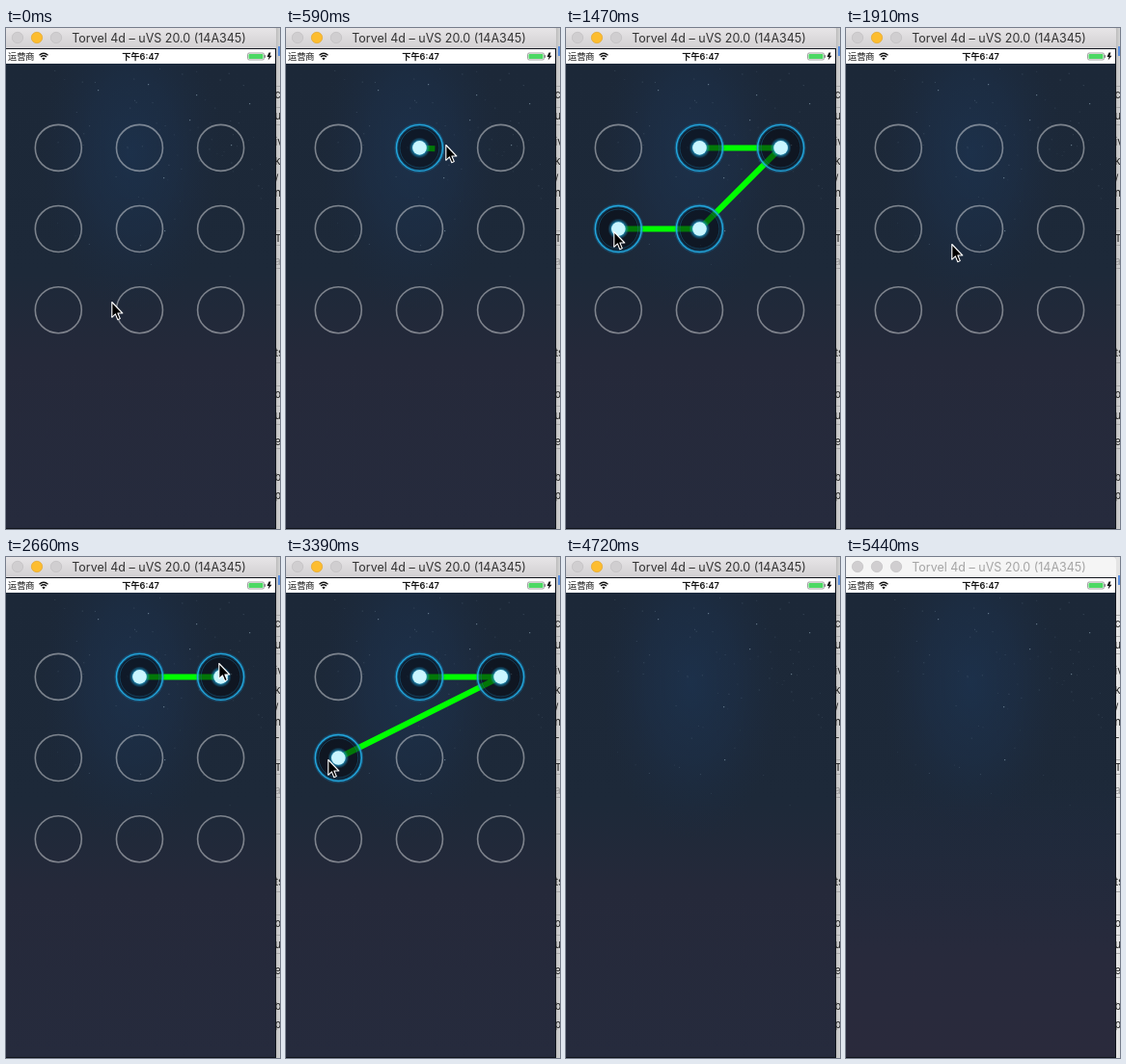
An HTML page that plays this animation: 284 px wide and 520 px high, repeating every 5.54 s.

```html
<!DOCTYPE html>
<html lang="zh">
<head>
<meta charset="utf-8">
<title>Pattern unlock</title>
<style>
html, body { margin: 0; width: 100%; height: 100%; overflow: hidden; background: #ddd; }
svg { display: block; width: 284px; height: 520px; }
text { font-family: Inter, "Noto Sans CJK SC", "Noto Sans CJK", sans-serif; }
.away #yellow { fill: #d0ced0; stroke: #bdbbbd; }
.away #title { fill: #a5a5a5; }
.away #bar { fill: #f5f5f5; }
.away #side { fill: #e4e4e4; }
#dusk { opacity: 0; }
.away #dusk { opacity: 1; }
</style>
</head>
<body>
<svg id="stage" viewBox="0 0 284 520">
  <defs>
    <linearGradient id="barFill" x2="0" y2="1">
      <stop stop-color="#e7e5e7"/><stop offset="1" stop-color="#d1cfd1"/>
    </linearGradient>
    <linearGradient id="sideFill">
      <stop stop-color="#bcbcbc"/><stop offset="1" stop-color="#d6d6d6"/>
    </linearGradient>
    <linearGradient id="sky" x2="0" y2="1">
      <stop stop-color="#1c2838"/><stop offset=".45" stop-color="#1d2939"/>
      <stop offset=".64" stop-color="#25293a"/><stop offset="1" stop-color="#262b3d"/>
    </linearGradient>
    <radialGradient id="glow">
      <stop stop-color="#1c3350" stop-opacity=".75"/>
      <stop offset=".5" stop-color="#1c2f48" stop-opacity=".6"/>
      <stop offset="1" stop-color="#1c2b40" stop-opacity="0"/>
    </radialGradient>
    <linearGradient id="duskFill" x2="0" y2="1">
      <stop stop-color="#1e2a3d" stop-opacity="0"/><stop offset=".25" stop-color="#202a3c" stop-opacity=".8"/>
      <stop offset=".65" stop-color="#282a3c"/><stop offset="1" stop-color="#2a2a3c"/>
    </linearGradient>
    <radialGradient id="halo">
      <stop offset=".55" stop-color="#29b8e8" stop-opacity=".9"/>
      <stop offset="1" stop-color="#1590c8" stop-opacity="0"/>
    </radialGradient>
    <clipPath id="screen"><rect y="37" width="279" height="482"/></clipPath>
    <g id="node">
      <circle r="23" fill="#04080f" fill-opacity=".55"/>
      <circle r="24" fill="none" stroke="#1682b8" stroke-width="4" stroke-opacity=".35"/>
      <circle r="24" fill="none" stroke="#22a6dc" stroke-width="1.4"/>
      <circle r="20.5" fill="none" stroke="#1a6f9c" stroke-width="1" stroke-opacity=".45"/>
      <circle r="11" fill="url(#halo)"/>
      <circle r="7.3" fill="#c9f5ff"/>
    </g>
  </defs>

  <rect id="side" x="280" width="4" height="520" fill="url(#sideFill)"/>
  <g id="behind" font-size="11"></g>

  <path id="bar" d="M0 0H276Q280 0 280 4V22H0Z" fill="url(#barFill)"/>
  <g fill="#d0ced0" stroke="#bdbbbd" stroke-width=".6">
    <circle cx="12" cy="10" r="5.7"/>
    <circle id="yellow" cx="32" cy="10" r="5.7" fill="#fdbd2f" stroke="#dfa023"/>
    <circle cx="52" cy="10" r="5.7"/>
  </g>
  <text id="title" x="158.5" y="15" font-size="12.5" text-anchor="middle" fill="#333">Torvel 4d – uVS 20.0 (14A345)</text>

  <rect y="21" width="280" height="499" fill="#10141c"/>
  <rect y="22" width="279" height="15" fill="#fff"/>
  <g fill="#111">
    <text x="2" y="33" font-size="9.2">运营商</text>
    <text x="139.5" y="33" font-size="9.2" font-weight="600" text-anchor="middle">下午6:47</text>
    <path d="M272.5 25.5L270.5 30H272.6L271.6 33.5L275.6 28.8H273.4L274.5 25.5Z"/>
    <path d="M39 33.4L37.3 31.5Q39 30.2 40.7 31.5Z"/>
    <path d="M36 30Q39 27.5 42 30M34.5 28.2Q39 24.3 43.5 28.2" fill="none" stroke="#111" stroke-width="1.3"/>
  </g>
  <rect x="250.5" y="26" width="17" height="7" rx="1.5" fill="#fff" stroke="#777" stroke-width=".7"/>
  <rect x="251.5" y="27" width="15" height="5" rx=".7" fill="#4cd964"/>
  <path d="M268.6 28.2V30.8" stroke="#777"/>

  <g clip-path="url(#screen)">
    <rect y="37" width="279" height="482" fill="url(#sky)"/>
    <ellipse cx="130" cy="130" rx="95" ry="165" fill="url(#glow)"/>
    <rect id="dusk" y="230" width="279" height="289" fill="url(#duskFill)"/>
    <g id="stars" fill="#8ea6b8"></g>
  </g>

  <g id="rings" fill="none" stroke="#fff" stroke-opacity=".42" stroke-width="1.6"></g>
  <polyline id="line" fill="none" stroke="#00ff00" stroke-width="6" stroke-linejoin="round"/>
  <g id="nodes"></g>
  <path id="cursor" d="M0 0V15.8L3.6 12.4L6 18.2L8.5 17.1L6.1 11.5H11Z" fill="#000" stroke="#fff" stroke-width="1.1" stroke-linejoin="round"/>
</svg>
<script>
const LOOP = 5540, AWAY = 5440, LAG = 0.6, HIT = 24;
const $ = id => document.getElementById(id);

function add(parent, tag, attrs, text) {
  const el = document.createElementNS("http://www.w3.org/2000/svg", tag);
  for (const key in attrs) el.setAttribute(key, attrs[key]);
  if (text) el.textContent = text;
  parent.appendChild(el);
  return el;
}

// Cursor path per gesture, sampled every `step` ms; `down` is the sample of the press.
const gestures = [
  { start: 0, step: 146, down: 3, path: [[110, 285], [117, 255], [129, 200], [137, 130], [166, 122],
    [215, 122], [200, 148], [150, 200], [98, 203], [60, 207], [50, 212]] },
  { start: 1910, step: 148, down: 2, path: [[110, 225], [120, 188], [134, 138], [152, 124], [190, 124],
    [221, 111], [214, 128], [196, 143], [140, 165], [85, 190], [44, 211]] },
  { start: 3840, step: 145, down: Infinity, path: [[68, 248], [104, 322], [125, 386], [140, 440],
    [150, 488], [155, 512], [158, 540]] }
];

const dots = Array.from({ length: 9 }, (_, i) => [54.3 + 84.15 * (i % 3), 124.4 + 84.15 * Math.floor(i / 3)]);
const nodes = dots.map(([x, y]) => {
  add($("rings"), "circle", { cx: x, cy: y, r: 24 });
  return add($("nodes"), "use", { href: "#node", transform: `translate(${x} ${y})` });
});

function drawStars() {
  let seed = 11;
  const rnd = () => (seed = (seed * 16807) % 2147483647) / 2147483647;
  for (let i = 0; i < 75; i++) {
    const x = 50 + 215 * rnd(), y = 42 + 235 * rnd() * (0.4 + 0.6 * rnd());
    add($("stars"), "rect", { x, y, width: 1, height: 1, opacity: 0.1 + 0.2 * rnd() });
  }
  for (const [x, y] of [[147, 58], [163, 155], [252, 78], [190, 95], [197, 69], [233, 121], [164, 210], [95, 64]])
    add($("stars"), "rect", { x, y, width: 1.2, height: 1.2, opacity: 0.6 });
}

function drawBehind() {
  const g = $("behind");
  for (const y of [60, 82, 100, 210, 225, 249, 287, 347, 371, 392, 411, 436])
    add(g, "rect", { x: 280, y, width: 4, height: 1, fill: "#a8a8a8" });
  add(g, "rect", { x: 282, y: 19, width: 2, height: 10, fill: "#5a8fe0" });
  const bits = { 73: "c", 95: "u", 122: "iv", 142: "k", 160: "/", 175: "n", 191: "-", 222: "T",
    246: "a", 341: "ts", 384: "o", 406: "u", 433: "e", 470: "b", 489: "p" };
  for (const y in bits) add(g, "text", { x: 278.5, y, fill: y === "246" ? "#999" : "#222" }, bits[y]);
}

function hitNodes(gesture, last) {
  const hit = [];
  for (let i = gesture.down; i <= last; i++) {
    const [x, y] = gesture.path[i];
    const n = dots.findIndex(d => Math.hypot(d[0] - x, d[1] - y) < HIT);
    if (n >= 0 && !hit.includes(n)) hit.push(n);
  }
  return hit;
}

function draw(t) {
  const k = gestures.findLastIndex(g => t >= g.start);
  const { start, step, path, down } = gestures[k];
  const end = path.length - 1;
  const i = Math.min(end, Math.floor((t - start) / step));
  const [x, y] = path[i];
  const hit = hitNodes(gestures[k], i);
  const fresh = hit.length > hitNodes(gestures[k], i - 1).length;

  // The line trails the cursor, but snaps to a node as it is reached.
  const points = hit.map(n => dots[n]);
  if (i > down && i < end && !fresh) {
    const [px, py] = path[i - 1];
    points.push([px + (x - px) * LAG, py + (y - py) * LAG]);
  }
  $("line").setAttribute("points", points.join(" "));
  nodes.forEach((el, n) => el.setAttribute("visibility", hit.includes(n) ? "visible" : "hidden"));
  $("rings").setAttribute("opacity", k === 2 ? 1 - i / end : 1);
  [...$("rings").children].forEach((el, n) =>
    el.setAttribute("visibility", hit.includes(n) ? "hidden" : "visible"));
  $("cursor").setAttribute("transform", `translate(${x - 0.2} ${y - 0.5})`);
  $("stage").classList.toggle("away", t >= AWAY);
}

drawStars();
drawBehind();
const began = performance.now();
function tick() {
  draw((performance.now() - began) % LOOP);
  requestAnimationFrame(tick);
}
tick();
</script>
</body>
</html>
```
